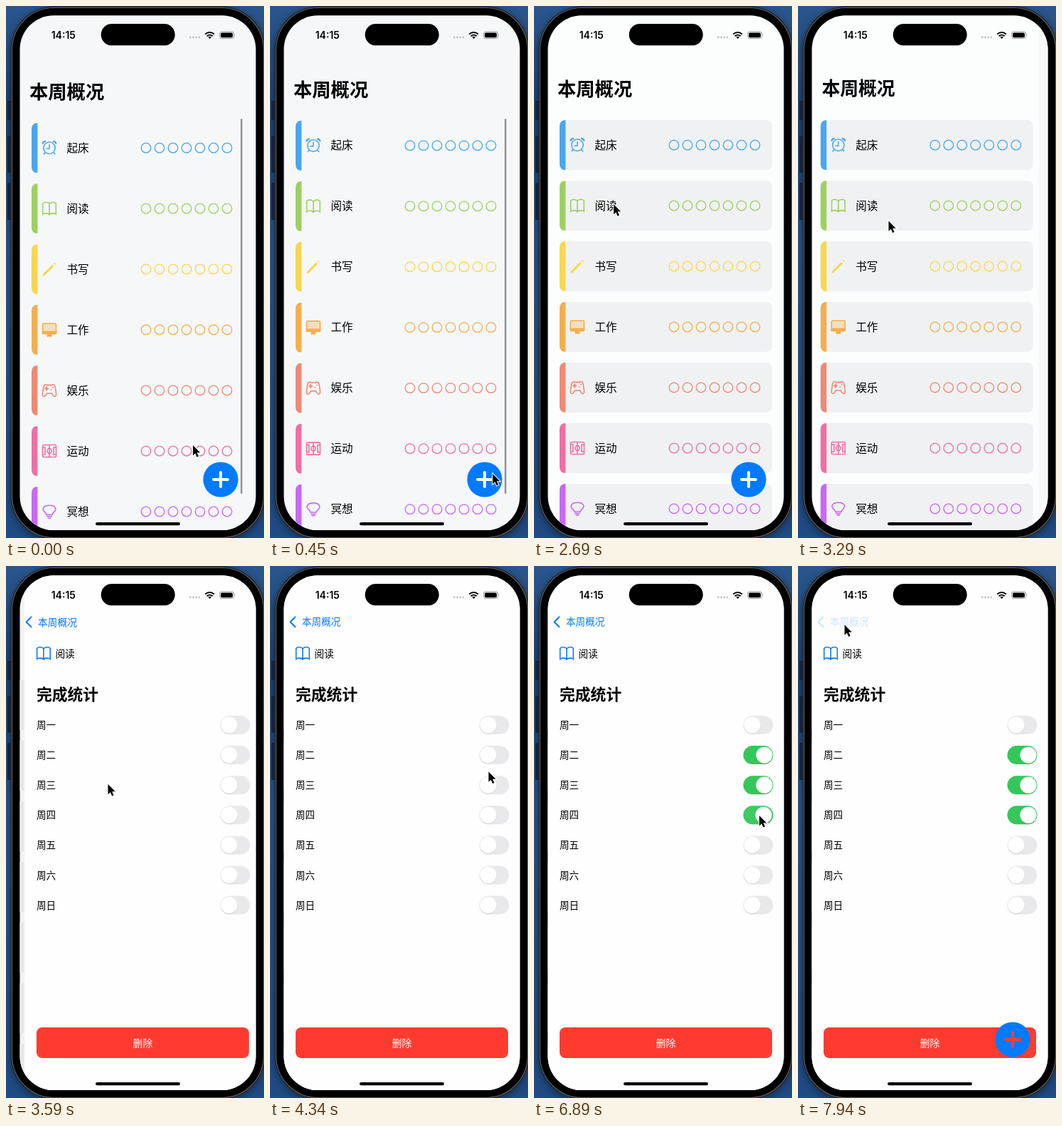
These frames come from a looping animation (363x746 px, 8 s). An HTML page:

```html
<!DOCTYPE html>
<html lang="zh-CN">
<head>
<meta charset="utf-8">
<style>
html, body { margin: 0; width: 100%; height: 100%; overflow: hidden; background: #234d82; }
svg { display: block; font-family: "Noto Sans CJK SC", "Noto Sans CJK", sans-serif; }
</style>
</head>
<body>
<svg id="stage" width="363" height="746" viewBox="0 0 363 746">
  <defs>
    <clipPath id="screen"><rect x="19.5" y="13.3" width="332" height="721.7" rx="47.5"/></clipPath>
    <linearGradient id="wall" x2="0" y2="1">
      <stop stop-color="#2a568e"/><stop offset=".2" stop-color="#1f416f"/>
      <stop offset=".45" stop-color="#28558c"/><stop offset="1" stop-color="#1f4a84"/>
    </linearGradient>
    <filter id="soft"><feGaussianBlur stdDeviation="6"/></filter>
  </defs>
  <rect width="363" height="746" fill="url(#wall)"/>
  <rect x="6.5" y="3" width="358" height="747" rx="61" opacity=".4" filter="url(#soft)"/>
  <path d="M2 133h5v27h-5zM2 182h5v52h-5zM2 248h5v52h-5z" fill="#17233a"/>
  <rect x="6.5" y=".5" width="358" height="747" rx="61" fill="#242426"/>
  <rect x="8.5" y="2.5" width="354" height="743" rx="59" stroke="#5d5b59" stroke-width="1.2"/>
  <rect x="11.5" y="5.5" width="348" height="737" rx="56"/>
  <g clip-path="url(#screen)" id="view"></g>
  <rect x="133.7" y="25" width="104" height="30.3" rx="15.1"/>
  <text x="80.8" y="45.6" font-size="14" font-weight="600" text-anchor="middle" style="font-family:Inter,sans-serif">14:15</text>
  <path d="M259.3 44h.01m4.2 0h.01m4.2 0h.01m4.2 0h.01" stroke="#c2c3c5" stroke-width="2.8" stroke-linecap="round"/>
  <path d="M280.2 39.6a9.2 9.2 0 0 1 12.8 0M282.6 42.2a5.8 5.8 0 0 1 8 0" fill="none" stroke="#000" stroke-width="1.9"/>
  <path d="M284.3 43.7a3.4 3.4 0 0 1 4.6 0l-2.3 2.4z"/>
  <rect x="300.5" y="36" width="20" height="9.6" rx="3" fill="none" stroke="#9a9a9c"/>
  <rect x="302" y="37.4" width="17" height="6.8" rx="1.8"/>
  <path d="M321.7 39.2q1.7 1.6 0 3.2z" fill="#9a9a9c"/>
  <rect x="126" y="724" width="119" height="4.2" rx="2.1"/>
  <path id="cursor" d="M0 0V14.2L3.3 11.2 5.6 16.4 8 15.4 5.7 10.3H10.2Z" stroke="#fff" stroke-width="2" paint-order="stroke"/>
</svg>
<script>
const view = document.getElementById('view');
const cursor = document.getElementById('cursor');
const LOOP = 8000, BLUE = '#087aff';
const BOOK = '<path d="M0-6.5C-2-9.4-7.5-9.4-9.3-7V8C-7 6-2 6.2 0 8.5 2 6.2 7 6 9.3 8V-7C7.5-9.4 2-9.4 0-6.5V8.5"/>';

// label, colour, icon drawn around its centre
const habits = [
  ['起床', '#4aa6ee', '<circle r="8.2"/><path d="M0-5V1H-4.5M-5.8 6.2-8 9.2M5.8 6.2 8 9.2"/><path d="M-9.5-5.4Q-9.3-9.3-5-9.2M9.5-5.4Q9.3-9.3 5-9.2" stroke-width="2.2"/>'],
  ['阅读', '#9dd060', BOOK],
  ['书写', '#f8d74f', '<path d="M-7.2 7.2 5.2-5.2M7-7 8.1-8.1" stroke-width="3.2"/><path d="M-9.7 9.7-8.6 5.9-5.9 8.6Z" fill="currentColor" stroke="none"/>'],
  ['工作', '#f3ae4e', '<rect x="-9.5" y="-8.8" width="19" height="14.6" rx="1.5" fill="#f3dfbd"/><path d="M-9.5 2.6H9.5V5H-9.5ZM-2.5 6H2.5V8.8H-2.5ZM-3.5 9H3.5" fill="currentColor"/>'],
  ['娱乐', '#ee8a73', '<path d="M-4.5-8.5Q-7.5-8.2-8.3-4.5L-9.6 5Q-9.7 9-7 8.6-5.6 8.2-3.5 4.2H3.5Q5.6 8.2 7 8.6 9.7 9 9.6 5L8.3-4.5Q7.5-8.2 4.5-8.5L3.4-7.4H-3.4Z"/><path d="M-6-2.5H-1.6M-3.8-4.7V-.3M2.5-1h.01M5.2-4h.01" stroke-width="1.9" stroke-linecap="round"/>'],
  ['运动', '#ee6fa4', '<rect x="-9.5" y="-8.5" width="19" height="17" rx="1.5"/><ellipse rx="3" ry="3.6"/><path d="M0-8.5V8.5M-9.5-5H-6V5H-9.5M9.5-5H6V5H9.5"/>'],
  ['冥想', '#c768f8', '<path d="M-4 4.4Q-4.2 2.4-7 .2C-11-4-8-8.8 0-8.8S11-4 7 .2Q4.2 2.4 4 4.4Z"/><path d="M-3.8 6.8H3.8M-2.4 9H2.4"/>']
];
const days = '一二三四五六日';
const toggledAt = { 1: 4690, 2: 5140, 3: 6640 };

// pointer keys: time, x, y
const pointer = [
  [0, 263, 616], [300, 290, 634], [750, 360, 700], [900, 400, 760], [2249, 400, 760],
  [2250, 186, 262], [2540, 150, 270], [2690, 112, 278], [2840, 99, 281], [3140, 118, 296],
  [3290, 127.5, 301.5], [3590, 143.5, 306], [4040, 147, 326], [4190, 230, 316], [4340, 307.5, 288.5],
  [4490, 314, 237], [4640, 316, 260], [4940, 317, 266], [5090, 317, 300], [5240, 318, 306],
  [5390, 319, 382], [5540, 318.5, 372], [5840, 318, 373], [6290, 316, 366], [6590, 317, 352],
  [6890, 317, 350], [7040, 290, 315], [7190, 205, 215], [7340, 110, 120], [7490, 66, 91],
  [7640, 65, 85], [7790, 65.5, 82.5], [8000, 65.5, 82.5]
];

const mix = (a, b, k) => a + (b - a) * k;
// critically damped spring
const spring = ms => {
  const x = Math.max(0, ms) * .01826;
  return 1 - (1 + x) * Math.exp(-x);
};
const pullAt = t => 4 * Math.exp(-t / 250);
const text = (s, x, mid, size, extra = '') =>
  `<text x="${x}" y="${mid + size * .37}" font-size="${size}" ${extra}>${s}</text>`;
const rect = (x, y, w, h, fill, rx = 0, extra = '') =>
  `<rect x="${x}" y="${y}" width="${w}" height="${h}" rx="${rx}" fill="${fill}" ${extra}/>`;
const pane = (fill, opacity = 1) => rect(19, 13, 333, 723, fill, 0, `opacity="${opacity}"`);
const icon = (art, x, y, color) =>
  `<g transform="translate(${x} ${y})" fill="none" stroke="${color}" color="${color}" stroke-width="1.6">${art}</g>`;

function habitRow([label, color, art], i, pull, card) {
  const y = 160 + 85 * i + pull, mid = y + 35;
  let dots = '';
  for (let d = 0; d < 7; d++) dots += `<circle cx="${197 + 19 * d}" cy="${mid}" r="6.8"/>`;
  return rect(36, y, 299, 70, card, 8) +
    `<path d="M44.4 ${y}v70q-8.4 0-8.4-9v-52q0-9 8.4-9" fill="${color}"/>` +
    icon(art, 61, mid, color) + text(label, 85.5, mid, 15.6) +
    `<g fill="none" stroke="${color}" stroke-width="1.3">${dots}</g>`;
}

function scrollbar(t) {
  let s = '';
  if (t >= 1350) {
    s += rect(329, 158, 5, 530, '#f2f3f5') + rect(329, 158, 5, 2, '#fff');
    for (let i = 0; i < 6; i++) s += rect(329, 229 + 85 * i, 5, 17, '#fff', 2);
  }
  const alpha = Math.min(1, Math.max(0, (1650 - t) / 450));
  return s + rect(330, 158, 2.6, 526, '#959698', 1.3, `opacity="${alpha}"`);
}

function listPage(t, push) {
  const early = t < 2250, page = early ? '#f5f7f9' : '#fcfdfd';
  return pane(page) + `<g transform="translate(${-108 * push})">` +
    habits.map((h, i) => habitRow(h, i, pullAt(t), early ? page : '#f0f1f3')).join('') + '</g>' +
    (early ? scrollbar(t) : '') + pane('#000', push * .04);
}

function dayRow(day, i, t) {
  const y = 223 + 42.1 * i, on = i in toggledAt ? spring(t - toggledAt[i]) : 0;
  const x = mix(307, 324, on);
  return text('周' + day, 36, y, 13.6) + rect(294.5, y - 13, 42, 26, '#e9e9eb', 13) +
    rect(294.5, y - 13, 42, 26, '#34c759', 13, `opacity="${on}"`) +
    `<circle cx="${x}" cy="${y + 1}" r="11.8" opacity=".1"/><circle cx="${x}" cy="${y}" r="11.6" fill="#fff"/>`;
}

function detailPage(t, push) {
  return `<g transform="translate(${332 * (1 - push)})">` + pane('#fefefe') + pane('#000', .02 * (1 - push)) +
    icon(BOOK, 46, 122.5, BLUE) + text('阅读', 62.5, 123, 13.7) +
    text('完成统计', 36, 180, 21.8, 'font-weight="700"') +
    [...days].map((d, i) => dayRow(d, i, t)).join('') +
    rect(36, 647, 299, 43, '#ff3b30', 8) +
    text('删除', 185.5, 669, 13.8, 'fill="#fff" text-anchor="middle"') + '</g>';
}

// the large title shrinks into the back label
function header(t, push) {
  const look = `font-weight="${push > .5 ? 400 : 700}" fill="rgb(${8 * push},${122 * push},${255 * push})"`;
  return `<g opacity="${t >= 7790 ? .2 : 1}">` +
    text('本周概况', mix(33, 45, push), mix(116.5, 78, push) + pullAt(t) * .9, mix(26.3, 13.6, push), look) +
    `<path d="M35.5 71.5 28.5 78.5 35.5 85.5" fill="none" stroke="${BLUE}" stroke-width="2" stroke-linecap="round" stroke-linejoin="round" opacity="${push * push}"/></g>`;
}

const addButton = cross => `<circle cx="302" cy="664" r="24.6" fill="#007aff"/>
  <path d="M292 664h20M302 654v20" stroke="${cross}" stroke-width="4" stroke-linecap="round"/>`;

function pointerAt(t) {
  const i = pointer.findIndex(k => k[0] > t), [t0, x0, y0] = pointer[i - 1], [t1, x1, y1] = pointer[i];
  const k = (t - t0) / (t1 - t0);
  return [mix(x0, x1, k), mix(y0, y1, k)];
}

const stepTime = t => t < 2540 ? Math.min(2250, Math.floor(t / 150) * 150)
  : 2540 + Math.floor((t - 2540) / 150) * 150;

let start, shown;
function draw(now) {
  start ??= now;
  const t = stepTime((now - start) % LOOP);
  if (t !== shown) {
    shown = t;
    const raw = spring(t - 3273), push = raw > .997 ? 1 : raw;
    view.innerHTML = listPage(t, push) + (push ? detailPage(t, push) : '') + header(t, push) +
      (t < 3290 ? addButton('#fff') : t >= 7940 ? addButton('#ff3b30') : '');
    cursor.setAttribute('transform', `translate(${pointerAt(t)})`);
  }
  requestAnimationFrame(draw);
}
requestAnimationFrame(draw);
</script>
</body>
</html>
```
